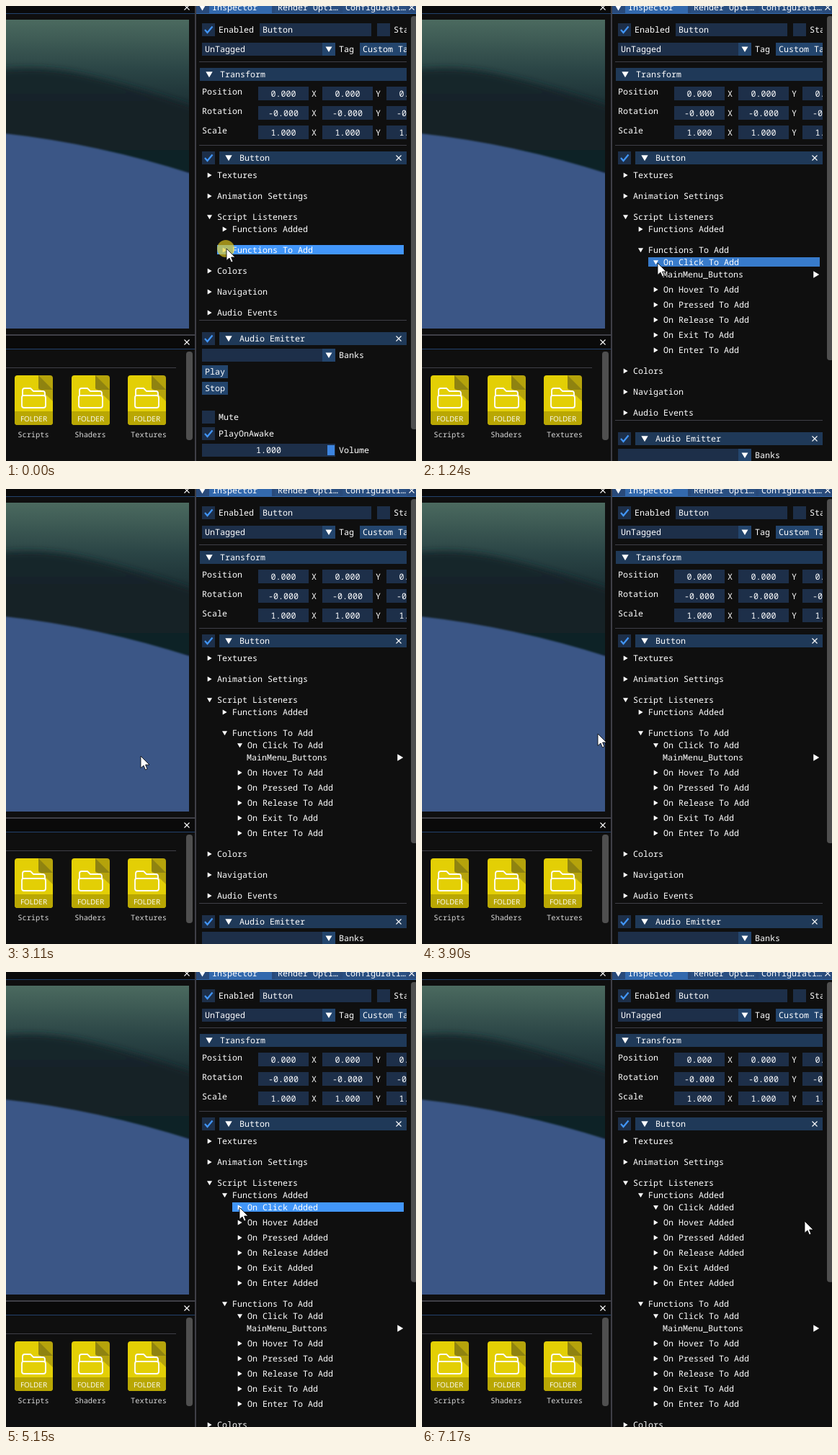
Write an HTML page that moves like this. It is 569x632 px and loops after 7330 ms.

```html
<!DOCTYPE html>
<html lang="en">
<head>
<meta charset="utf-8">
<title>Inspector</title>
<style>
html, body { margin: 0; width: 100%; height: 100%; overflow: hidden; background: #0f0f0f; }
svg { display: block; width: 100vw; height: 100vh; }
text { font: 11.67px "Noto Sans Mono", "DejaVu Sans Mono", monospace; fill: #fff; text-rendering: geometricPrecision; }
text.small { font-size: 10.4px; fill: #d8d8d8; }
text.tag { font: 10px "Open Sans", sans-serif; }
</style>
</head>
<body>
<svg viewBox="0 0 569 632" preserveAspectRatio="none">
  <defs>
    <linearGradient id="sky" x1="0" y1="0" x2="0" y2="1">
      <stop offset="0" stop-color="#4b6a5f"/>
      <stop offset=".55" stop-color="#2a4445"/>
      <stop offset="1" stop-color="#182b30"/>
    </linearGradient>
    <linearGradient id="hill" x1="0" y1="0" x2="0" y2="1">
      <stop offset="0" stop-color="#14262a"/>
      <stop offset="1" stop-color="#0f1c22"/>
    </linearGradient>
    <filter id="soft"><feGaussianBlur stdDeviation="5"/></filter>
    <filter id="edge"><feGaussianBlur stdDeviation="1.3"/></filter>
    <clipPath id="view"><rect y="19" width="254" height="429"/></clipPath>
  </defs>
  <g id="left"></g>
  <g id="right"></g>
  <g id="tree"></g>
  <g id="tabs"></g>
  <g id="popup"></g>
  <circle id="click" r="12" fill="#e8d020" opacity=".65"/>
  <path id="cursor" d="M0 0V16.5L4 13L6.5 19L9 18L6.6 12H12Z" fill="#fff" stroke="#000" stroke-width=".8"/>
</svg>
<script>
const LOOP = 7330;
const FRAME = '#1d2f49', BUTTON = '#23456d', HEADER = '#1f3958', LINE = '#3f3f47';
const HOVER = '#387bcb', ACTIVE = '#4296fa', GRIP = '#4f4f4f', PANEL = '#0f0f0f';
const el = id => document.getElementById(id);

const rect = (x, y, w, h, fill, extra = '') =>
  `<rect x="${x}" y="${y}" width="${w}" height="${h}" fill="${fill}" ${extra}/>`;
const path = (d, fill, extra = '') => `<path d="${d}" fill="${fill}" ${extra}/>`;
const text = (x, cy, s, extra = '') => `<text x="${x}" y="${cy + 4}" ${extra}>${s}</text>`;
const mid = (x, cy, s, extra = '') => text(x, cy, s, 'text-anchor="middle" ' + extra);
const down = (x, y, r) => path(`M${x - r} ${y - r * .8}h${2 * r}L${x} ${y + r * .9}Z`, '#fff');
const right = (x, y, r) => path(`M${x - r * .8} ${y - r}v${2 * r}L${x + r * .9} ${y}Z`, '#fff');
const cross = (x, y) =>
  path(`M${x - 3.5} ${y - 3.5}l7 7m0 -7l-7 7`, 'none', 'stroke="#fff" stroke-width="1.1"');
const rule = y => rect(268, y, 288, 1, LINE);

function check(y, on, x = 272) {
  const mark = path(`M${x + 4} ${y}l3.5 4l7 -8.5`, 'none', `stroke="${ACTIVE}" stroke-width="2.2"`);
  return rect(x, y - 9, 18, 18, FRAME) + (on ? mark : '');
}
const combo = (y, value, label) => rect(272, y - 9, 167, 18, FRAME) + rect(439, y - 9, 18, 18, BUTTON) +
  down(448, y, 4.5) + text(276, y, value) + text(462, y, label);
const button = (x, y, w, label) => rect(x, y - 9, w, 18, BUTTON) + text(x + 4, y, label);
const component = (y, label) => check(y, true) + rect(296, y - 9, 260, 18, HEADER) +
  down(309, y, 4.7) + text(324, y, label) + cross(545, y);

function folder(x, cx, label) {
  return `<g transform="translate(${x} 513)">` +
    path('M4 0H33L53 21V65q0 4-4 4H4q-4 0-4-4V4q0-4 4-4Z', '#e3cf05') +
    path('M33 0H49q4 0 4 4V36L33 17Z', '#b5a30b') +
    path('M33 0L53 20H36q-3 0-3-3Z', '#8f8310') +
    path('M0 50H53V65q0 4-4 4H4q-4 0-4-4Z', '#b9a703') +
    path('M11 29V21q0-3 3-3h8l4 4h13q3 0 3 3v4M12 28H40q3 0 3 3v11q0 3-3 3H13q-3 0-3-3V31q0-3 2-3Z',
      'none', 'stroke="#fff" stroke-width="1.8"') +
    mid(26.5, 59.7, 'FOLDER', 'class="tag"') + '</g>' + mid(cx, 595, label, 'class="small"');
}

function drawLeft() {
  el('left').innerHTML =
    rect(0, 0, 262, 10, '#0a0a0a') + rect(0, 10, 262, 1, '#23426c') + cross(251, 2) +
    '<g clip-path="url(#view)">' + rect(0, 19, 254, 130, 'url(#sky)') +
    path('M-30 92Q40 80 110 96T290 150V300H-30Z', 'url(#hill)', 'filter="url(#soft)"') +
    path('M-10 176Q130 191 264 235V460H-10Z', '#3b5686', 'filter="url(#edge)"') + '</g>' +
    rect(0, 456, 262, 2, LINE) + rect(0, 458, 262, 18, '#0a0a0a') + rect(0, 476, 262, 1, '#23426c') +
    cross(251, 467) + rect(0, 502, 236, 1, LINE) + rect(250, 480, 9, 123, GRIP, 'rx="4"') +
    folder(12, 38, 'Scripts') + folder(91, 117, 'Shaders') + folder(169, 198, 'Textures') +
    rect(262, 0, 2, 632, LINE);
}

function drawRight() {
  let s = check(33, true) + text(295, 33, 'Enabled') + rect(352, 24, 155, 18, FRAME) +
    text(356, 33, 'Button') + check(33, false, 515) + text(538, 33, 'Static') +
    combo(60, 'UnTagged', 'Tag') + button(491, 60, 78, 'Custom Tag') + rule(77) +
    rect(269, 86, 287, 18, HEADER) + down(282, 95, 4.7) + text(297, 95, 'Transform');
  [['Position', '0.000'], ['Rotation', '-0.000'], ['Scale', '1.000']].forEach(([name, value], i) => {
    const y = 122 + 27 * i;
    s += text(272, y - 3, name);
    ['X', 'Y', ''].forEach((axis, k) => {
      const x = 350 + 89 * k;
      s += rect(x, y - 10, 70, 19, FRAME) + mid(x + 35, y, value) + text(x + 74, y, axis);
    });
  });
  s += rule(193) + component(211, 'Button') + right(282.5, 235, 3.5) + text(293, 235, 'Textures') +
    right(282.5, 264, 3.5) + text(293, 264, 'Animation Settings') +
    down(282.5, 293, 3.5) + text(293, 293, 'Script Listeners');
  el('right').innerHTML = s + rect(556, 12, 13, 620, PANEL);
  el('tabs').innerHTML = rect(264, 0, 305, 10, '#294a7a') + rect(282, 0, 87, 10, '#3369ad') +
    rect(373, 0, 90, 10, '#2a4f81') + rect(467, 0, 89, 10, '#2a4f81') + rect(264, 10, 305, 1, '#3369ad') +
    down(272.5, 3, 4) + text(286, 2, 'Inspector') + text(377, 2, 'Render Opti…') +
    text(471, 2, 'Configurati…') + cross(563, 2);
}

const smooth = u => u * u * (3 - 2 * u);
const quicken = u => u ** 1.5;
const settle = u => 1 - (1 - u) ** 3.45;

// start, end, steps, x, y, easing
const moves = [
  [550, 950, 6, 327, 357, smooth],
  [1560, 1730, 3, 322, 372, smooth],
  [2180, 2790, 9, 187, 371, smooth],
  [3580, 4280, 10, 300, 309, smooth],
  [4750, 5070, 5, 324, 327, smooth],
  [5530, 5760, 4, 400, 340, quicken],
  [5900, 6630, 11, 527, 350, settle],
  [6700, 6770, 2, 531, 346, smooth]
];
const presses = [[0, 160], [1170, 1240], [3020, 3110], [4510, 4670], [5150, 5300], [7010, 7170]];
const rings = [[0, 160], [1170, 1240], [3020, 3110], [4590, 4670], [5230, 5300], [7090, 7170]];
const during = (spans, t) => spans.some(([a, b]) => t >= a && t < b);

function pointer(t) {
  let x = 306, y = 337;
  for (const [a, b, n, tx, ty, ease] of moves) {
    if (t < a) break;
    const step = Math.min(n, Math.floor((t - a) / (b - a) * (n - 1) + 1e-6) + 1);
    const k = ease(step / n);
    x += (tx - x) * k;
    y += (ty - y) * k;
  }
  return { x: Math.round(x), y: Math.round(y) };
}

const kinds = ['Click', 'Hover', 'Pressed', 'Release', 'Exit', 'Enter'];
const listed = ['AddVolume', 'Controls', 'Credits', 'ExitGame', 'FullScreen', 'Muffin', 'NewGame',
  'Settings', 'SubtractVolume'];

function audio(d) {
  const y = n => n + d;
  return rule(y(436)) + component(y(462), 'Audio Emitter') + combo(y(485), '', 'Banks') +
    button(272, y(508), 36, 'Play') + button(272, y(531), 36, 'Stop') +
    check(y(571), false) + text(295, y(571), 'Mute') + check(y(594), true) + text(295, y(594), 'PlayOnAwake') +
    rect(272, y(608), 185, 18, FRAME) + rect(446, y(610), 10, 14, '#3d85e0') +
    mid(364.5, y(617), '1.000') + text(462, y(617), 'Volume');
}

function drawTree(t, p, menu) {
  const press = during(presses, t);
  let y = 310, s = '';

  function row(x, label, open) {
    const over = !menu && t < 7170 && p.x >= x - 10 && p.x < 552 && p.y >= y - 7 && p.y < y + 6;
    if (over) s += rect(x - 10, y - 7, 562 - x, 13, press ? ACTIVE : HOVER);
    s += (open ? down : right)(x + .5, y, 3.5) + text(x + 11, y, label);
  }
  function section(suffix, open, clickOpen, child) {
    row(303, 'Functions ' + suffix, open);
    if (open) {
      y += 17;
      kinds.forEach((kind, i) => {
        row(324, `On ${kind} ${suffix}`, !i && clickOpen);
        if (!i && clickOpen) child();
        if (i < 5) y += 21;
      });
    }
    y += 29;
  }

  section('Added', t >= 4670, t >= 5300, () => {
    if (t >= 7170) return;
    y += 17;
    const fill = t < 6700 ? '#a50000' : press ? '#cc1a1a' : '#b81c1c';
    s += text(334, y, 'MainMenu_Buttons::AddVolume') + rect(529, y - 6, 15, 18, fill) + mid(536.5, y + 3, 'X');
    y += 6;
  });
  section('To Add', t >= 160, t >= 1240, () => {
    y += 17;
    const over = menu ? p.x > 268 : t >= 1560 && t < 1730 && p.y >= 365;
    if (over || menu) s += rect(331, y - 8, 225, 16, over ? HOVER : HEADER);
    s += text(334, y, 'MainMenu_Buttons') + right(547, y, 4.7);
  });

  const d = y - 368;
  for (const label of ['Colors', 'Navigation', 'Audio Events']) {
    row(282, label, false);
    y += 29;
  }
  el('tree').innerHTML = s + audio(d) + rect(562, 14, 9, 397200 / (692 + d), GRIP, 'rx="4"');
}

function drawPopup(menu, p) {
  let s = '';
  if (menu) {
    s = rect(5.5, 358.5, 262, 164, '#141414', `fill-opacity=".94" stroke="${LINE}"`);
    if (p.x < 264) s += rect(9, 365, 255, 16, HOVER);
    listed.forEach((name, i) => { s += text(12, 373 + 17 * i, 'MainMenu_Buttons::' + name); });
  }
  el('popup').innerHTML = s;
}

function draw(t) {
  const p = pointer(t), menu = t >= 1730 && t < 3110;
  drawTree(t, p, menu);
  drawPopup(menu, p);
  el('cursor').setAttribute('transform', `translate(${p.x} ${p.y})`);
  el('click').setAttribute('transform', `translate(${p.x - 1} ${p.y})`);
  el('click').style.display = during(rings, t) ? '' : 'none';
}

drawLeft();
drawRight();
draw(0);
const start = performance.now();
function tick() {
  draw((performance.now() - start) % LOOP);
  requestAnimationFrame(tick);
}
requestAnimationFrame(tick);
</script>
</body>
</html>
```
